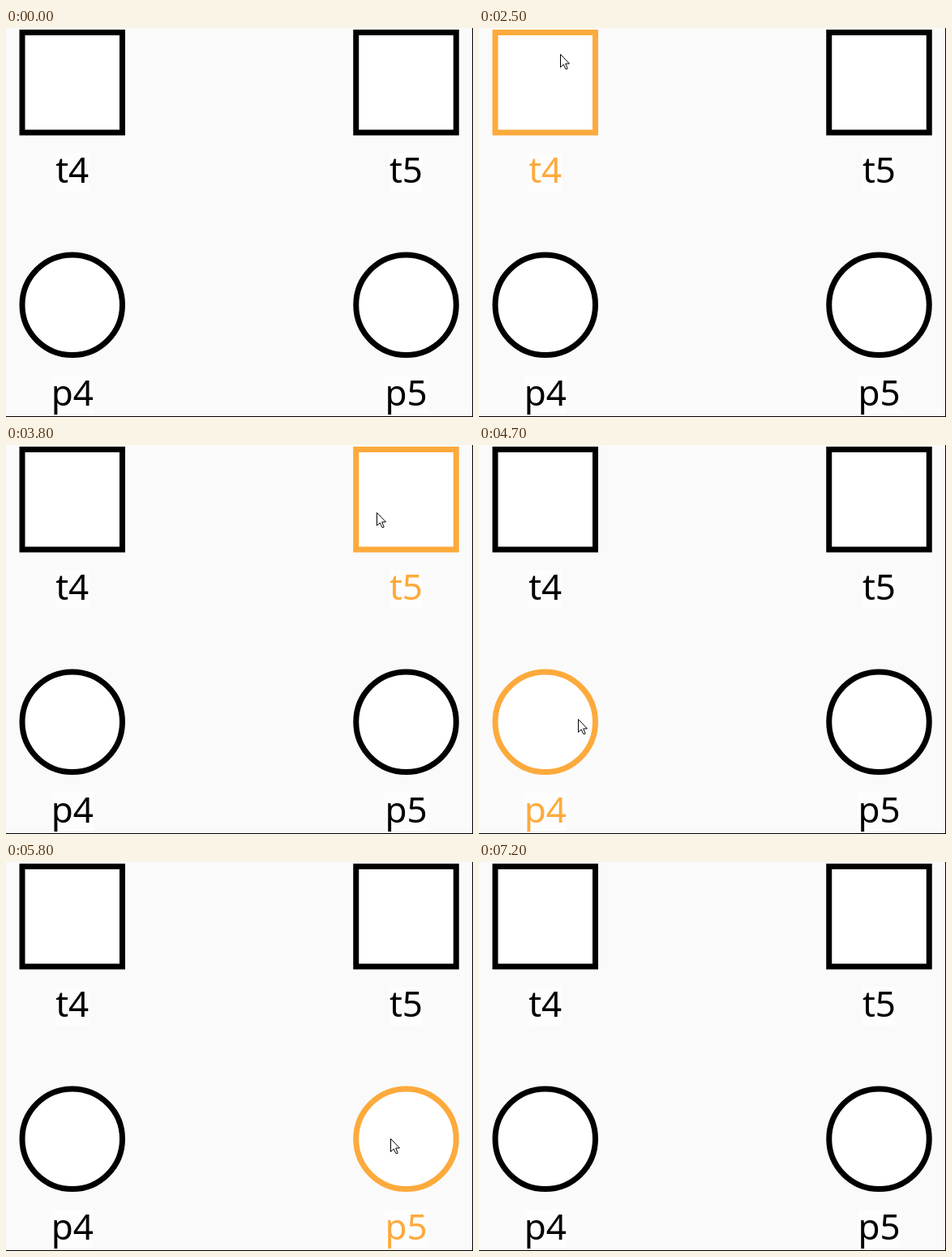
Animation, 576 px wide and 480 px high, one loop 7500 ms. Source, as an HTML page with a canvas:

```html
<!DOCTYPE html>
<html lang="en">
<head>
<meta charset="utf-8">
<title>Node linking</title>
<style>
  html, body { margin: 0; width: 100%; height: 100%; overflow: hidden; background: #fafafa; }
  canvas { display: block; }
</style>
</head>
<body>
<canvas id="stage" width="576" height="480"></canvas>
<script>
const ctx = document.getElementById('stage').getContext('2d');
const LOOP = 7500, STEP = 100;
const ORANGE = '#fdaa3c', BACK = '#fafafa';
const R = 61.75, BORDER = 7;

const makeNode = (label, col, row) =>
  ({ label, x: 81.75 + col * 411.75, y: 67.25 + row * 274.5, square: row === 0 });
const t4 = makeNode('t4', 0, 0), t5 = makeNode('t5', 1, 0);
const p4 = makeNode('p4', 0, 1), p5 = makeNode('p5', 1, 1);
const nodes = [t4, t5, p4, p5];

const smooth = u => u * u * (3 - 2 * u);
const speedUp = u => u ** 4;

// Each move runs on from the stop before it; times are in steps
const entry = { x: 120, y: -18 };
const moves = [
  { from: 18, to: 23, x: 100, y: 32, ease: smooth },
  { from: 25, to: 34.8, x: 457, y: 83, ease: smooth, source: t4, drop: 35, gap: { x: -7, y: 6 } },
  { from: 38, to: 42.6, x: 116, y: 338, ease: smooth },
  { from: 46.2, to: 56.5, x: 474, y: 341, ease: smooth, source: p4, drop: 58, gap: { x: -17, y: -2 } },
  { from: 61, to: 68, x: 44, y: 383, ease: speedUp }
];

const moveAt = step => moves.findLast(m => step >= m.from);

function pointerAt(step) {
  const move = moveAt(step);
  if (!move || step > moves.at(-1).to) return null;
  const a = moves[moves.indexOf(move) - 1] || entry;
  const k = move.ease(Math.min(1, (step - move.from) / (move.to - move.from)));
  return { x: a.x + (move.x - a.x) * k, y: a.y + (move.y - a.y) * k };
}

function isOver(node, p) {
  if (!p) return false;
  const dx = Math.abs(p.x - node.x), dy = Math.abs(p.y - node.y);
  return (node.square ? Math.max(dx, dy) : Math.hypot(dx, dy)) < R + BORDER / 2;
}

function drawNode(node, active) {
  const { x, y, label } = node;
  const color = active ? ORANGE : '#000';
  ctx.beginPath();
  if (node.square) ctx.rect(x - R, y - R, 2 * R, 2 * R);
  else ctx.arc(x, y, R, 0, 2 * Math.PI);
  ctx.fillStyle = '#fff';
  ctx.fill();
  ctx.lineWidth = BORDER;
  ctx.strokeStyle = color;
  ctx.stroke();

  const w = ctx.measureText(label).width;
  ctx.fillStyle = '#fdfdfd';
  ctx.fillRect(x - w / 2, y + 87, w, 47);
  ctx.fillStyle = color;
  ctx.fillText(label, x, y + 124);
}

function drawArrow({ source, gap }, p) {
  const x = source.x + R, y = source.y;
  const dx = p.x + gap.x - x, dy = p.y + gap.y - y;
  if (dx < 5) return;
  const len = Math.hypot(dx, dy), head = Math.min(36, len);
  ctx.save();
  ctx.translate(x, y);
  ctx.rotate(Math.atan2(dy, dx));
  ctx.fillStyle = ORANGE;
  ctx.fillRect(0, -BORDER / 2, len - head + 1, BORDER);
  ctx.beginPath();
  ctx.moveTo(len, 0);
  ctx.lineTo(len - head, -18);
  ctx.lineTo(len - head, 18);
  ctx.fill();
  ctx.restore();
}

const arrowhead = new Path2D('M0 0V16L3.7 12.5L6.3 18H8.5V17L6.2 11.5H11Z');

function drawPointer(p) {
  ctx.save();
  ctx.translate(Math.round(p.x) + 0.5, Math.round(p.y) + 0.5);
  ctx.fillStyle = '#fff';
  ctx.strokeStyle = '#000';
  ctx.lineWidth = 1;
  ctx.fill(arrowhead);
  ctx.stroke(arrowhead);
  ctx.restore();
}

function draw(step) {
  const p = pointerAt(step), move = moveAt(step);
  ctx.fillStyle = BACK;
  ctx.fillRect(0, 0, 576, 480);
  ctx.font = '44px "Noto Sans", "Open Sans", sans-serif';
  ctx.textAlign = 'center';
  nodes.forEach(n => drawNode(n, isOver(n, p)));
  if (move && step < move.drop) drawArrow(move, p);
  ctx.fillStyle = '#000';
  ctx.fillRect(575, 0, 1, 480);
  ctx.fillRect(0, 479, 576, 1);
  if (p) drawPointer(p);
}

const start = performance.now();
function tick() {
  const t = (performance.now() - start) % LOOP;
  draw(Math.floor(t / STEP));
  requestAnimationFrame(tick);
}
tick();
</script>
</body>
</html>
```
